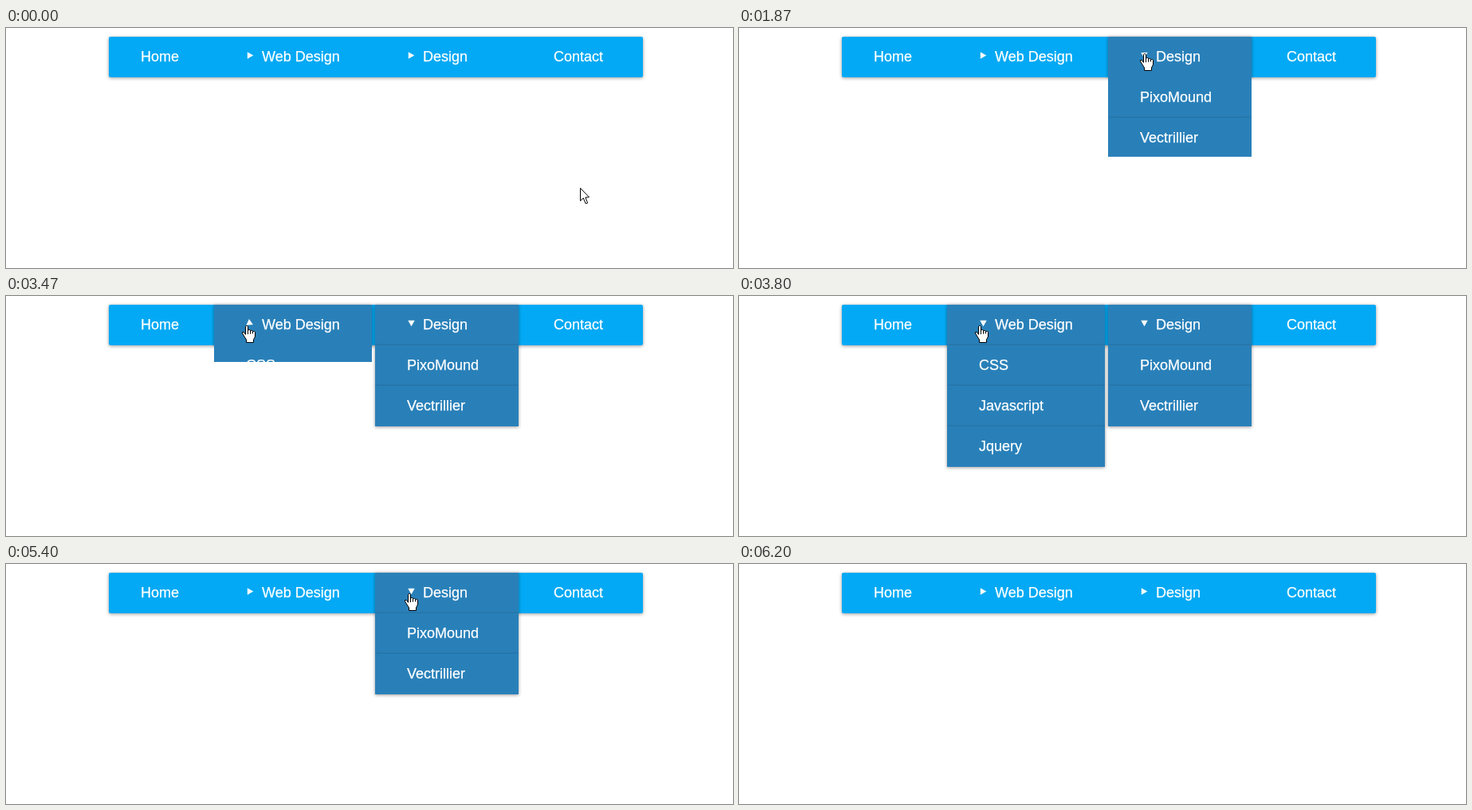
Recreate the animation shown at these times as an HTML page with a canvas. Size 912 by 302 pixels, loop 7140 ms.

```html
<!DOCTYPE html>
<html lang="en">
<head>
<meta charset="utf-8">
<title>Dropdown menu</title>
<style>
html, body { margin: 0; width: 912px; height: 302px; overflow: hidden; background: #fff; }
canvas { display: block; }
</style>
</head>
<body>
<canvas id="stage" width="912" height="302"></canvas>
<script>
const ctx = document.getElementById('stage').getContext('2d');
const LOOP = 7140, FPS = 15;
const LIGHT = '#03a9f4', DARK = '#2980b9';
const TOP = 11, ROW = 51, PAD = 40, BASE = 31;

// times are in steps of 1/15 s
const menus = [
  { x: 261, w: 198, label: 'Web Design', rows: ['CSS', 'Javascript', 'Jquery'], open: 51, close: 71 },
  { x: 463, w: 180, label: 'Design', rows: ['PixoMound', 'Vectrillier'], open: 23, close: 83 }
];

const moves = [
  { from: 0, to: 11, x: 622, y: 174 },
  { from: 11, to: 20, x: 509, y: 43 },
  { from: 20, to: 22, x: 508, y: 32 },
  { from: 28, to: 33, x: 318, y: 32 },
  { from: 33, to: 36, x: 306, y: 32 },
  { from: 39, to: 42, x: 301, y: 37 },
  { from: 60, to: 63, x: 315, y: 37 },
  { from: 65, to: 67, x: 304, y: 36 },
  { from: 75, to: 81, x: 505, y: 37 },
  { from: 86, to: 93, x: 366, y: 310 }
];

const clamp = v => Math.min(1, Math.max(0, v));
const swing = t => .5 - Math.cos(Math.PI * t) / 2;
const ease = t => { const u = 1 - (1 - t) ** 2; return u * u * (3 - 2 * u); };

function pointerAt(k) {
  let x = 720, y = 201;
  for (const m of moves) {
    const p = clamp((k - m.from) / (m.to - m.from));
    x += (m.x - x) * p;
    y += (m.y - y) * p;
  }
  return [Math.round(x), Math.round(y)];
}

function panel(x, y, w, h, color, r = 0) {
  ctx.save();
  ctx.fillStyle = color;
  ctx.shadowOffsetY = 1;
  ctx.shadowBlur = 4;
  ctx.shadowColor = 'rgba(0,0,0,.4)';
  ctx.beginPath();
  ctx.roundRect(x, y, w, h, r);
  ctx.fill();
  ctx.restore();
}

// a hairline stroke gives the text a little more weight
function text(str, x, y) {
  ctx.fillStyle = ctx.strokeStyle = '#fff';
  ctx.lineWidth = .25;
  ctx.fillText(str, x, y);
  ctx.strokeText(str, x, y);
}

function trace(...points) {
  ctx.beginPath();
  points.forEach(([x, y]) => ctx.lineTo(x, y));
}

function paint() {
  ctx.fill();
  ctx.stroke();
}

function triangle(x, y, turn) {
  ctx.save();
  ctx.translate(x, y);
  ctx.rotate(turn * Math.PI / 2);
  trace([-3.7, -4.2], [3.8, 0], [-3.7, 4.2]);
  ctx.fillStyle = '#fff';
  ctx.fill();
  ctx.restore();
}

function drawMenu(m, k) {
  const active = k >= m.open && k < m.close;
  const closing = k >= m.close;
  const since = (k - (closing ? m.close : m.open) + .45) / FPS;
  const progress = (fn, length) => {
    const p = fn(clamp(since / length));
    return closing ? 1 - p : p;
  };
  const shown = progress(swing, .4), turn = progress(ease, .5);

  if (active) panel(m.x, TOP, m.w, ROW, DARK);
  if (shown > 0) {
    ctx.save();
    if (shown < 1) {
      ctx.beginPath();
      ctx.rect(m.x, TOP + ROW, m.w, Math.round(m.rows.length * ROW * shown));
      ctx.clip();
    }
    m.rows.forEach((row, i) => {
      const y = TOP + ROW * (i + 1);
      if (active) panel(m.x, y, m.w, ROW, DARK);
      else {
        ctx.fillStyle = LIGHT;
        ctx.fillRect(m.x, y, m.w, ROW);
      }
      text(row, m.x + PAD, y + BASE);
    });
    ctx.restore();
  }
  triangle(m.x + 45.5, 34.5, turn);
  text(m.label, m.x + PAD + 20, TOP + BASE);
}

function arrow() {
  trace([.5, .5], [.5, 16.5], [4.3, 13], [7.2, 20], [9.6, 19.2], [6.9, 12.2], [11.5, 11.9]);
  ctx.closePath();
  paint();
}

function hand() {
  for (let i = 3; i >= 0; i--) {
    ctx.beginPath();
    ctx.roundRect(4.5 + 3 * i, i ? 4.5 + i : .5, 3, 14 - (i ? 4 + i : 0), 1.2);
    paint();
  }
  trace([4.5, 11.5], [2.5, 8.5], [.5, 8.5], [.5, 10], [5.5, 18], [5.5, 21.5],
    [14.5, 21.5], [14.5, 18], [16.5, 14], [16.5, 10]);
  paint();
}

function drawPointer(k) {
  const [x, y] = pointerAt(k);
  const onBar = y < TOP + ROW;
  ctx.save();
  ctx.translate(onBar ? x - 5 : x, y);
  ctx.lineWidth = 1;
  ctx.fillStyle = '#fff';
  ctx.strokeStyle = '#000';
  if (onBar) hand();
  else arrow();
  ctx.restore();
}

function draw(ms) {
  const k = Math.floor((ms % LOOP + 4) * FPS / 1000);
  ctx.fillStyle = '#fff';
  ctx.fillRect(0, 0, 912, 302);
  ctx.font = '18px "Liberation Sans", Arial, sans-serif';
  panel(129, TOP, 670, ROW, LIGHT, 2);
  text('Home', 129 + PAD, TOP + BASE);
  text('Contact', 647 + PAD, TOP + BASE);
  menus.forEach(m => drawMenu(m, k));
  drawPointer(k);
}

const start = performance.now();
function tick() {
  draw(performance.now() - start);
  requestAnimationFrame(tick);
}
tick();
</script>
</body>
</html>
```
